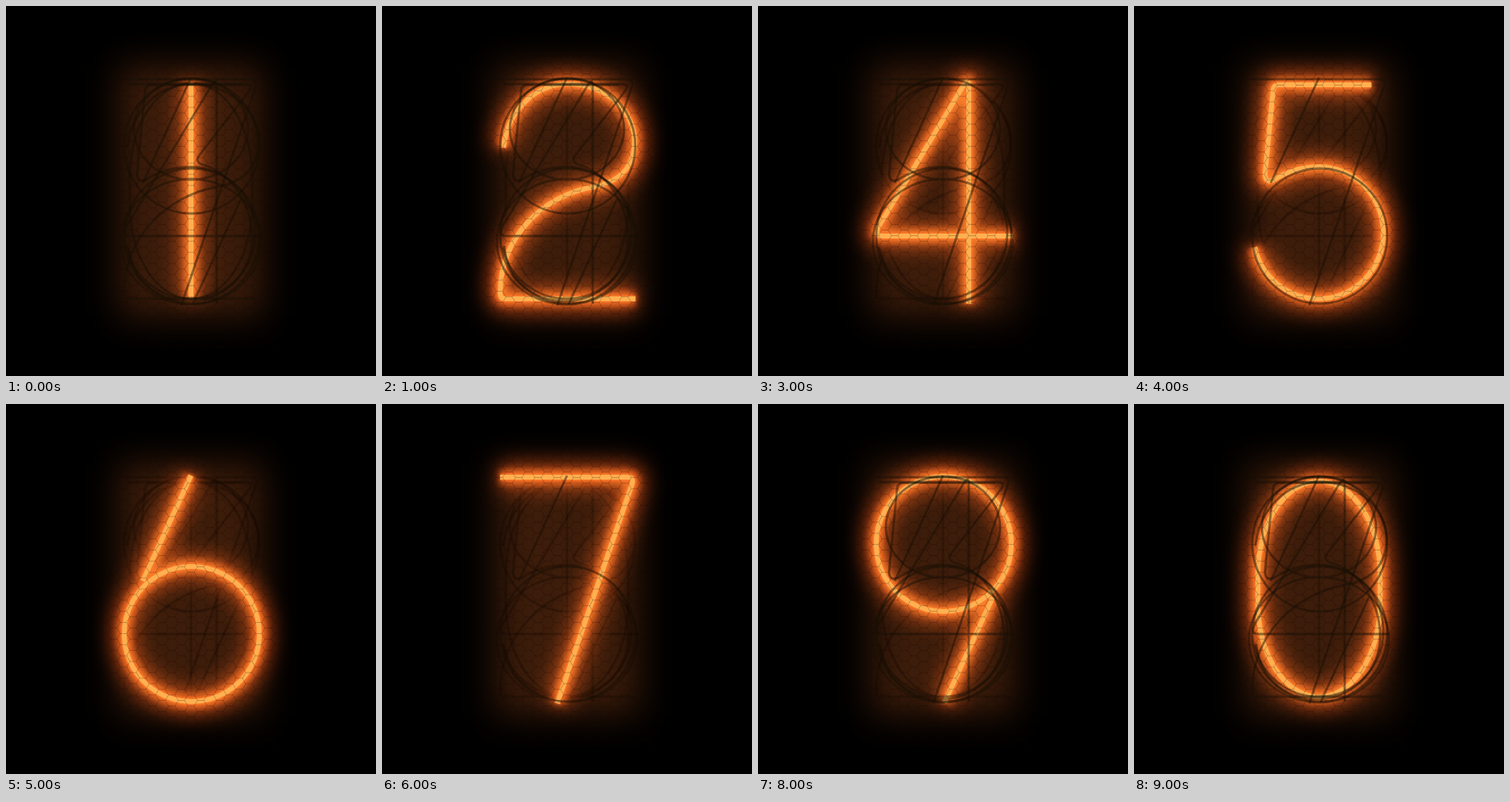
Recreate the animation shown at these times as an HTML page with a canvas. Size 460x460 px, loop 10000 ms.

```html
<!DOCTYPE html>
<html lang="en">
<head>
<meta charset="utf-8">
<title>Nixie counter</title>
<style>
  html, body { margin: 0; width: 100%; height: 100%; overflow: hidden; background: #000; }
  canvas { display: block; width: 460px; height: 460px; }
</style>
</head>
<body>
<canvas id="tube" width="460" height="460"></canvas>
<script>
const ctx = document.getElementById('tube').getContext('2d');

const digits = [
  'M154 212 A76 116 0 0 1 306 212 V248 A76 116 0 0 1 154 248 Z',
  'M230 95 V364',
  'M151 176 C156 130 190 97 231 97 C280 97 314 132 314 168 C314 200 295 219 262 225 C200 236 147 287 147 357 Q147 364 153 364 H315',
  'M150 97 H298 Q308 97 302 106 L240 186 Q235 194 244 197 C280 207 306 245 306 290 A78 78 0 0 1 228 367 C185 367 155 337 152 298',
  'M262 370 V99 Q262 89 256 98 L150 274 Q144 286 155 286 H317',
  'M295 98 H180 Q174 98 173 104 L163 208 Q163 221 174 216 C190 206 208 200 230 200 A80 82 0 0 1 230 364 C190 364 158 336 150 300',
  'M230 89 L170 220 M231 202 A84 84 0 1 1 230.9 202 Z',
  'M147 91 H306 Q313 91 311 99 L218 372',
  'M230 90 A71 63 0 1 1 229.9 90 Z M230 215 A87 78 0 1 1 229.9 215 Z',
  'M232 371 L292 240 M231 90 A84 84 0 1 1 230.9 90 Z'
].map(d => new Path2D(d));

// Cathode stack, back to front
const stack = [1, 0, 2, 9, 3, 4, 8, 5, 7, 6];

const mesh = new Path2D();
const side = 8, rowHeight = side * Math.sqrt(3);
for (let col = -9; col <= 9; col++) {
  for (let row = -13; row <= 13; row++) {
    const x = 230 + col * side * 1.5;
    const y = 230 + (row + (col & 1) / 2) * rowHeight;
    // Three edges per cell; neighbours supply the rest
    for (let k = 0; k <= 3; k++) {
      const a = k * Math.PI / 3;
      mesh[k ? 'lineTo' : 'moveTo'](x + side * Math.cos(a), y + side * Math.sin(a));
    }
  }
}

function stroke(path, width, color, blur = 0) {
  ctx.filter = blur ? `blur(${blur}px)` : 'none';
  ctx.lineWidth = width;
  ctx.strokeStyle = color;
  ctx.stroke(path);
}

function draw(digit) {
  const depth = stack.indexOf(digit);
  const lit = digits[digit];
  ctx.lineJoin = 'round';
  ctx.filter = 'none';
  ctx.fillStyle = '#000';
  ctx.fillRect(0, 0, 460, 460);

  ctx.filter = 'blur(22px)';
  ctx.fillStyle = '#3c1c0a';
  ctx.fillRect(142, 75, 176, 310);

  for (const d of stack.slice(0, depth)) stroke(digits[d], 3, 'rgba(18,7,2,.3)');

  ctx.globalCompositeOperation = 'screen';
  stroke(lit, 32, 'rgba(245,80,20,.62)', 12);
  stroke(lit, 17, 'rgba(255,82,25,.95)', 4);
  ctx.globalCompositeOperation = 'source-over';
  stroke(lit, 8, '#ff7a2a', .8);
  stroke(lit, 6, '#ffb050', .3);

  for (const d of stack.slice(depth + 1)) stroke(digits[d], 2.8, 'rgba(22,16,6,.47)');
  stroke(mesh, .8, 'rgba(25,8,0,.3)');
}

let shown = -1;
const start = performance.now();
function tick() {
  const digit = (Math.floor((performance.now() - start) / 1000) + 1) % 10;
  if (digit !== shown) draw(shown = digit);
  requestAnimationFrame(tick);
}
tick();
</script>
</body>
</html>
```
